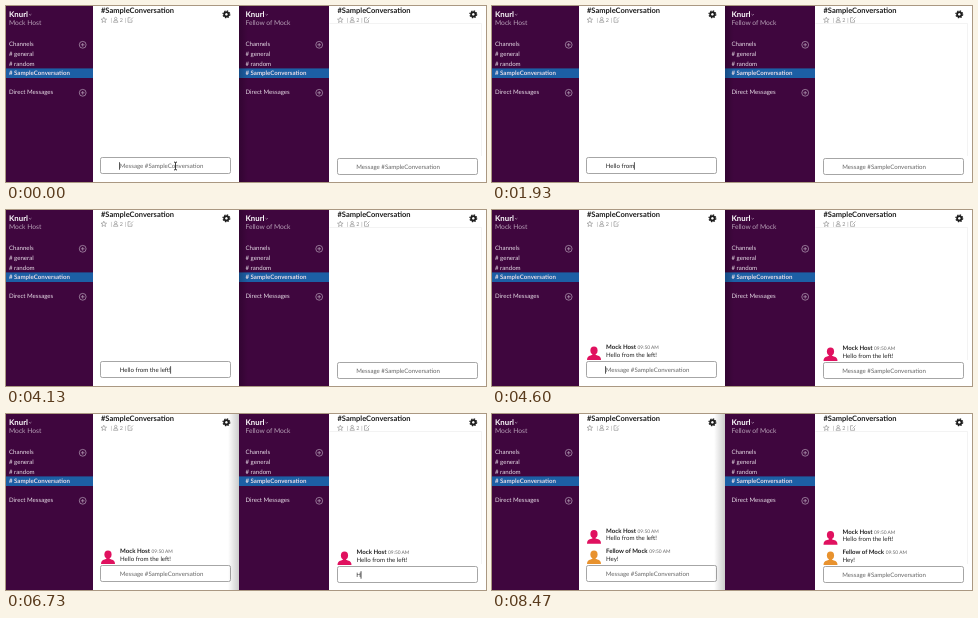
These frames come from a looping animation (480x176 px, 8540 ms). An HTML page:

```html
<!DOCTYPE html>
<html lang="en">
<head>
<meta charset="utf-8">
<title>Two chat windows</title>
<style>
  html, body { margin: 0; height: 100%; overflow: hidden; background: #fff; }
  svg { display: block; width: 100vw; height: 100vh; }
  text { font: 6.12px Lato, sans-serif; fill: #e6dce6; white-space: pre; text-rendering: geometricPrecision; }
  .bold { font-weight: 700; }
  .team { font-size: 7.8px; font-weight: 700; fill: #fff; }
  .user { font-size: 6.7px; fill: #b7a0b7; }
  .title { font-size: 7.5px; font-weight: 700; fill: #1c1c1c; }
  .info { font-size: 5.4px; fill: #888; }
  .dark { fill: #222; }
  .time { font-size: 4.85px; font-weight: 400; fill: #666; }
  .hint { fill: #666; }
  .line { fill: none; stroke: #888; stroke-width: .6; }
  .plus { fill: none; stroke: #b8a2b9; stroke-width: .7; }
</style>
</head>
<body>
<svg id="stage" viewBox="0 0 480 176">
  <defs>
    <linearGradient id="shade">
      <stop offset="0" stop-color="#000" stop-opacity="0"/>
      <stop offset="1" stop-color="#000" stop-opacity=".2"/>
    </linearGradient>
    <path id="plus" class="plus" d="M-3.4 0a3.4 3.4 0 1 0 6.8 0a3.4 3.4 0 1 0-6.8 0M-1.8 0h3.6M0-1.8v3.6"/>
    <g id="gear" fill="none" stroke="#1c1c1c">
      <circle r="2.2" stroke-width="1.8"/>
      <circle r="3.4" stroke-width="1.2" stroke-dasharray="1.4 1.27"/>
    </g>
    <g id="person">
      <ellipse cx="7" cy="5.4" rx="3.6" ry="4"/>
      <path d="M0 15Q0 11 3.600 10.400L5.400 9.800V8h3.200v1.800l1.800 .6Q14 11 14 15z"/>
    </g>
  </defs>
</svg>
<script>
const LOOP = 8540, LEFT_SENT = 4530, RIGHT_SENT = 7730;
const HOST = "Mock Host", GUEST = "Fellow of Mock", ROOM = "SampleConversation";
const stage = document.getElementById("stage");

const text = (x, y, cls, str) => `<text x="${x}" y="${y}" class="${cls}">${str}</text>`;

const message = (name, color, str) => `<g class="msg">
  <use href="#person" x="95" y="135" fill="${color}"/>
  <text x="114" y="139.2" class="bold dark">${name}<tspan class="time" dx="1.6">09:50 AM</tspan></text>
  ${text(114, 146.7, "dark", str)}</g>`;

// One window; edge and side bound the sidebar, dy is a small drop of the lower part
function addPane({ x, dy, edge, side, user, boxX, boxWidth, gearX }) {
  stage.insertAdjacentHTML("beforeend", `<g transform="translate(${x})">
    <rect x="${edge}" width="260" height="176" fill="#fff"/>
    <rect x="${edge}" width="${side - edge}" height="176" fill="#3f063e"/>
    <rect x="${edge}" y="62.4" width="${side - edge}" height="9.6" fill="#1c5fa5"/>
    ${text(3, 10.8, "team", "Knurl")}
    <path class="plus" d="M23 8.200l1.200 1 1.200-1"/>
    ${text(3, 18.7, "user", user)}
    ${text(3, 40, "", "Channels")}
    ${text(3, 50, "", "# general")}
    ${text(3, 59.6, "", "# random")}
    ${text(3, 69.4, "bold", "# " + ROOM)}
    ${text(3, 88.2, "", "Direct Messages")}
    <use href="#plus" x="76.7" y="38.8"/><use href="#plus" x="76.7" y="86.8"/>
    ${text(95, 6.9, "title", "#" + ROOM)}
    ${text(104.6, 15.7, "info", "|")}${text(113.8, 15.8, "info", "2")}${text(118.8, 15.7, "info", "|")}
    <path class="line" d="M97.800 11.200l.8 1.900 2 .1-1.600 1.300.6 2-1.800-1.100-1.800 1.100.6-2-1.600-1.300 2-.1z
      M107.500 16.300q0-2.200 2.200-2.200t2.200 2.200zM108.500 12.600a1.200 1.300 0 1 0 2.400 0a1.200 1.300 0 1 0-2.400 0
      M126 14v2.300h-4v-4.600h2.500M124 14.500l3-3"/>
    <use href="#gear" x="${gearX}" y="8.300"/>
    <g transform="translate(0 ${dy})">
      ${message(HOST, "#e0115f", "Hello from the left!")}
      ${message(GUEST, "#e8922e", "Hey!")}
      <rect x="${boxX}" y="151.500" width="${boxWidth}" height="16" rx="1.800" fill="#fff" stroke="#a6a6a6"/>
      ${text(113.8, 161.9, "hint", "Message #" + ROOM)}
      <text x="113.800" y="161.900" class="dark draft"></text>
      <rect class="caret" y="156.200" width=".700" height="7.500" fill="#111"/>
    </g></g>`);
  const g = stage.lastElementChild, find = s => g.querySelector(s);
  return { msgs: g.querySelectorAll(".msg"), hint: find(".hint"), draft: find(".draft"), caret: find(".caret") };
}

const left = addPane({ x: 0, dy: 0, edge: 0, side: 87, user: HOST, boxX: 94.5, boxWidth: 130, gearX: 220.4 });
const right = addPane({ x: 236.5, dy: 1, edge: -3.5, side: 86.5, user: GUEST, boxX: 95, boxWidth: 140, gearX: 230.8 });

// The window in front casts a shadow on the other one
stage.insertAdjacentHTML("beforeend", `
  <rect id="shadowRight" width="9" height="176" fill="url(#shade)" transform="matrix(-1 0 0 1 242 0)"/>
  <rect id="shadowLeft" x="222" width="11" height="176" fill="url(#shade)"/>
  <path d="M323.500 17.500H475.500V150" fill="none" stroke="#eee" stroke-width=".7"/>
  <path id="beam" d="M-1.500-4q1.500 0 1.500 1 0-1 1.500-1M0-3v6M-1.500 4q1.500 0 1.500-1 0 1 1.500 1" fill="none" stroke="#111" stroke-width=".8"/>
  <path id="arrow" d="M0 0v6.200l1.400-1.300 1 2.100 1-.5-1-2h2z" fill="#111" stroke="#fff" stroke-width=".3"/>`);
const [shadowRight, shadowLeft, beam, arrow] =
  ["shadowRight", "shadowLeft", "beam", "arrow"].map(id => document.getElementById(id));

const show = (el, on) => el.setAttribute("visibility", on ? "visible" : "hidden");
const within = (t, a, b) => t >= a && t < b;

// Typing: [time, letters typed so far]
const leftKeys = [[730, 1], [1000, 2], [1130, 3], [1270, 4], [1400, 5], [1530, 7], [1730, 8], [1870, 9],
  [1930, 10], [2060, 11], [2130, 12], [2200, 13], [2400, 14], [2670, 15], [2730, 16], [2870, 17],
  [2930, 18], [3130, 19], [4130, 20]];
const rightKeys = [[6730, 1], [6870, 2], [6930, 3], [7200, 4]];

function typed(str, keys, t, sent) {
  if (t >= sent) return "";
  const key = keys.filter(k => k[0] <= t).pop();
  return key ? str.slice(0, key[1]) : "";
}

function setPane(p, draft, caretOn, first, second) {
  p.draft.textContent = draft;
  show(p.hint, !draft);
  show(p.caret, caretOn);
  p.caret.setAttribute("x", 113.2 + (draft ? p.draft.getComputedTextLength() + .3 : 0));
  show(p.msgs[0], first);
  show(p.msgs[1], second);
  p.msgs[0].setAttribute("transform", `translate(0 ${second ? -20.3 : 0})`);
}

// Pointer stops: [time, x, y]
const stops = [[0, 169.5, 160], [5000, 169.5, 160], [5070, 216, 163.5], [5400, 216, 163.5],
  [5670, 361, 166.5], [5740, 361, 166.5], [6000, 361, 161.5], [LOOP, 361, 161.5]];

function pointer(t) {
  const i = stops.findIndex(s => s[0] > t), [t0, x0, y0] = stops[i - 1], [t1, x1, y1] = stops[i];
  const k = (t - t0) / (t1 - t0), e = k * k * (3 - 2 * k);
  return [x0 + (x1 - x0) * e, y0 + (y1 - y0) * e];
}

function draw(t) {
  const both = t >= 7800, rightInFront = t >= 5600;
  setPane(left, typed("Hello from the left!", leftKeys, t, LEFT_SENT),
    t < 470 || within(t, 730, 3670) || within(t, 4130, 5070), t >= LEFT_SENT, both);
  setPane(right, typed("Hey!", rightKeys, t, RIGHT_SENT),
    within(t, 6070, 6530) || within(t, 6730, 8270), t >= 4600, both);
  show(shadowRight, !rightInFront);
  show(shadowLeft, rightInFront);

  const [x, y] = pointer(t);
  const visible = t < 730 || within(t, 5000, 6730);
  const overText = x < 224 || t >= 5870;
  show(beam, visible && overText);
  show(arrow, visible && !overText);
  for (const el of [beam, arrow]) el.setAttribute("transform", `translate(${x} ${y})`);
}

const start = performance.now();
function tick() {
  draw((performance.now() - start) % LOOP);
  requestAnimationFrame(tick);
}
tick();
</script>
</body>
</html>
```
